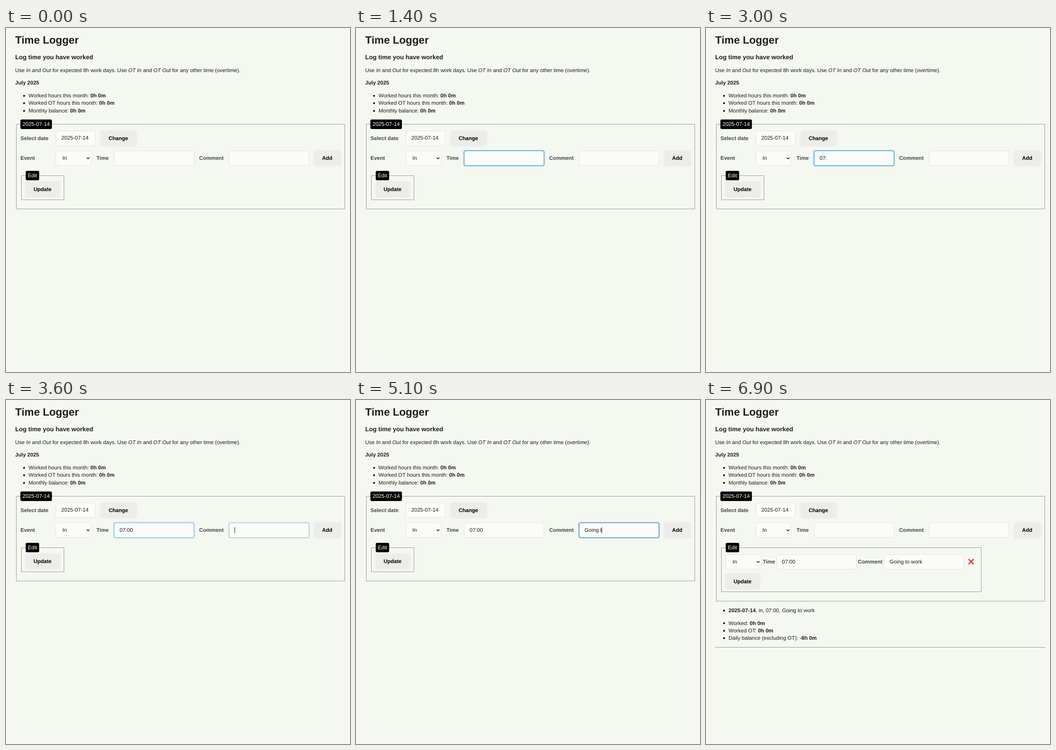
These frames come from a looping animation (748x749 px, 8 s). An HTML page:

```html
<!DOCTYPE html>
<html lang="en">
<head>
<meta charset="utf-8">
<title>Time Logger</title>
<style>
  html, body { margin: 0; width: 100%; height: 100%; overflow: hidden; background: #f5f7f1; }
  svg { display: block; }
  text { font: 11.55px "Liberation Sans", Arial, sans-serif; fill: #1c1d1b; white-space: pre; text-rendering: geometricPrecision; }
  .b { font-weight: bold; }
  .i { font-style: italic; }
  .label { font-weight: bold; fill: #454744; }
  .black { font-weight: bold; fill: #000; }
  .white { fill: #fff; }
  .h1 { font-size: 23.1px; font-weight: bold; }
  .h3 { font-size: 13.5px; font-weight: bold; }
  .field { fill: #fbfcf9; stroke: #e2e4df; }
  .frame { fill: none; stroke: #979a95; }
  .button { fill: #ecedea; filter: drop-shadow(0 0 2px #e6e8e3); }
  .ring { fill: none; stroke: #bfdcef; stroke-width: 2.2; }
  .edge { fill: none; stroke-width: 1.1; }
  .arrow { fill: none; stroke: #111; stroke-width: 1.5; }
  .cross { stroke: #dd3338; stroke-width: 2.6; stroke-linecap: round; }
</style>
</head>
<body>
<svg id="stage" width="748" height="749" viewBox="0 0 748 749"></svg>
<script>
const text = (x, y, str, cls = '') => `<text x="${x}" y="${y}" class="${cls}">${str}</text>`;
const span = (str, cls = 'b') => `<tspan class="${cls}">${str}</tspan>`;
const box = (x, y, w, h, cls, r = 3.5) =>
  `<rect x="${x}" y="${y}" width="${w}" height="${h}" rx="${r}" class="${cls}"/>`;
const frame = (x, y, w, h) => box(x, y, w, h, 'frame', 0);
const bullet = (y, str) => `<circle cx="39.3" cy="${y - 3.5}" r="2"/>` + text(49, y, str);
const legend = (x, y, w, str) => box(x, y, w, 20.6, '', 3) + text(x + 4.7, y + 14.1, str, 'white');
const button = (x, y, w, str) => box(x, y, w, 32.5, 'button') + text(x + 16.9, y + 19.5, str, 'black');
const input = (x, y, w, str = '') => box(x, y, w, 32, 'field') + text(x + 11.8, y + 19.4, str);
const select = (x, y) => box(x, y, 76.5, 32, 'field') + text(x + 14.2, y + 19.6, 'In') +
  `<path class="arrow" d="M${x + 67} ${y + 14.5}l3 3 3-3"/>`;
const focusField = (id, x) => `<g id="${id}">` + box(x, 267.5, 173.5, 32, 'field') +
  box(x - 1.3, 266.2, 176.1, 34.6, 'ring', 4.5) + box(x, 267.5, 173.5, 32, 'edge') +
  text(x + 11.8, 286.9, '') + `<path stroke="#222" d="M0 277v13"/></g>`;

const stage = document.getElementById('stage');
stage.innerHTML =
  text(20, 34, 'Time Logger', 'h1') +
  text(20, 67.7, 'Log time you have worked', 'h3') +
  text(20, 95.8, `Use ${span('In', 'i')} and ${span('Out', 'i')} for expected 8h work days. ` +
    `Use ${span('OT In', 'i')} and ${span('OT Out', 'i')} for any other time (overtime).`) +
  text(20, 123.2, 'July 2025', 'b') +
  bullet(151.2, 'Worked hours this month: ' + span('0h 0m')) +
  bullet(167.2, 'Worked OT hours this month: ' + span('0h 0m')) +
  bullet(183.9, 'Monthly balance: ' + span('0h 0m')) +
  `<g id="before">` + frame(22.5, 209.5, 714, 184.5) + frame(33.5, 321.5, 92.5, 52.5) +
    button(43, 335, 74, 'Update') + `</g>` +
  `<g id="after">` + frame(22.5, 209.5, 714, 228.5) + frame(33.5, 321.5, 565, 96) +
    select(43.5, 336.5) + text(123.5, 356, 'Time', 'label') + input(153.5, 336.5, 173.5, '07:00') +
    text(330.4, 356, 'Comment', 'label') + input(387.2, 336.5, 173.3, 'Going to work') +
    `<path class="cross" d="M571.7 347.2l9.6 9.6m0-9.6l-9.6 9.6"/>` + button(43, 379, 74, 'Update') +
    bullet(462, span('2025-07-14') + ', in, 07:00, Going to work') +
    bullet(489.5, 'Worked: ' + span('0h 0m')) +
    bullet(505.9, 'Worked OT: ' + span('0h 0m')) +
    bullet(522, 'Daily balance (excluding OT): ' + span('-8h 0m')) +
    `<path stroke="#979a95" d="M20 538.5H738"/></g>` +
  legend(31.3, 199.3, 68.5, '2025-07-14') + legend(42.9, 311, 29.2, 'Edit') +
  text(31.5, 243.8, 'Select date', 'label') + input(108.5, 224, 85.5, '2025-07-14') +
  button(206.3, 224, 77.5, 'Change') +
  text(31.5, 286.9, 'Event', 'label') + select(108.5, 267.5) +
  text(196.7, 286.9, 'Time', 'label') + focusField('time', 235.2) +
  text(420, 286.9, 'Comment', 'label') + focusField('comment', 485.2) +
  button(670.3, 267.2, 57.5, 'Add');

const SUBMIT = 6900;
const clamp = v => Math.max(0, Math.min(1, v));
const show = (el, on) => el.style.display = on ? '' : 'none';

// keys: when each character appears; carets: [on, off] spans
const fields = [
  { id: 'time', x: 247, value: '07:00', keys: [1700, 2100, 2400, 3200, 3300],
    focus: 900, blur: 3500, color: '#2f97e0', carets: [[900, 1400], [1700, 3000], [3200, 3500]] },
  { id: 'comment', x: 497, value: 'Going to work',
    keys: [4300, ...Array.from({ length: 12 }, (_, i) => 4600 + i * 100 + (i > 5 ? 100 : 0))],
    focus: 3500, blur: SUBMIT, color: '#4a7ca8', carets: [[3500, 4100], [4300, 6400]] }
];

// The highlight fades in or out over five steps of 100 ms
const fade = (t, start) => t < start ? 0 : clamp((t - start + 100) / 500);

function drawField(f, t) {
  const [, ring, edge, label, caret] = document.getElementById(f.id).children;
  const sent = t >= SUBMIT;
  const glow = sent ? 0 : fade(t, f.focus) - fade(t, f.blur);
  ring.style.opacity = edge.style.opacity = glow;
  edge.style.stroke = f.color;
  label.textContent = sent ? '' : f.value.slice(0, f.keys.filter(k => t >= k).length);
  show(caret, f.carets.some(([on, off]) => t >= on && t < off));
  const end = f.x + (label.textContent ? label.getComputedTextLength() : 0);
  caret.setAttribute('transform', `translate(${Math.floor(end) + .5})`);
}

function draw(now) {
  const t = Math.floor(now % 8000 / 100) * 100;
  show(document.getElementById('before'), t < SUBMIT);
  show(document.getElementById('after'), t >= SUBMIT);
  fields.forEach(f => drawField(f, t));
  requestAnimationFrame(draw);
}
requestAnimationFrame(draw);
</script>
</body>
</html>
```
